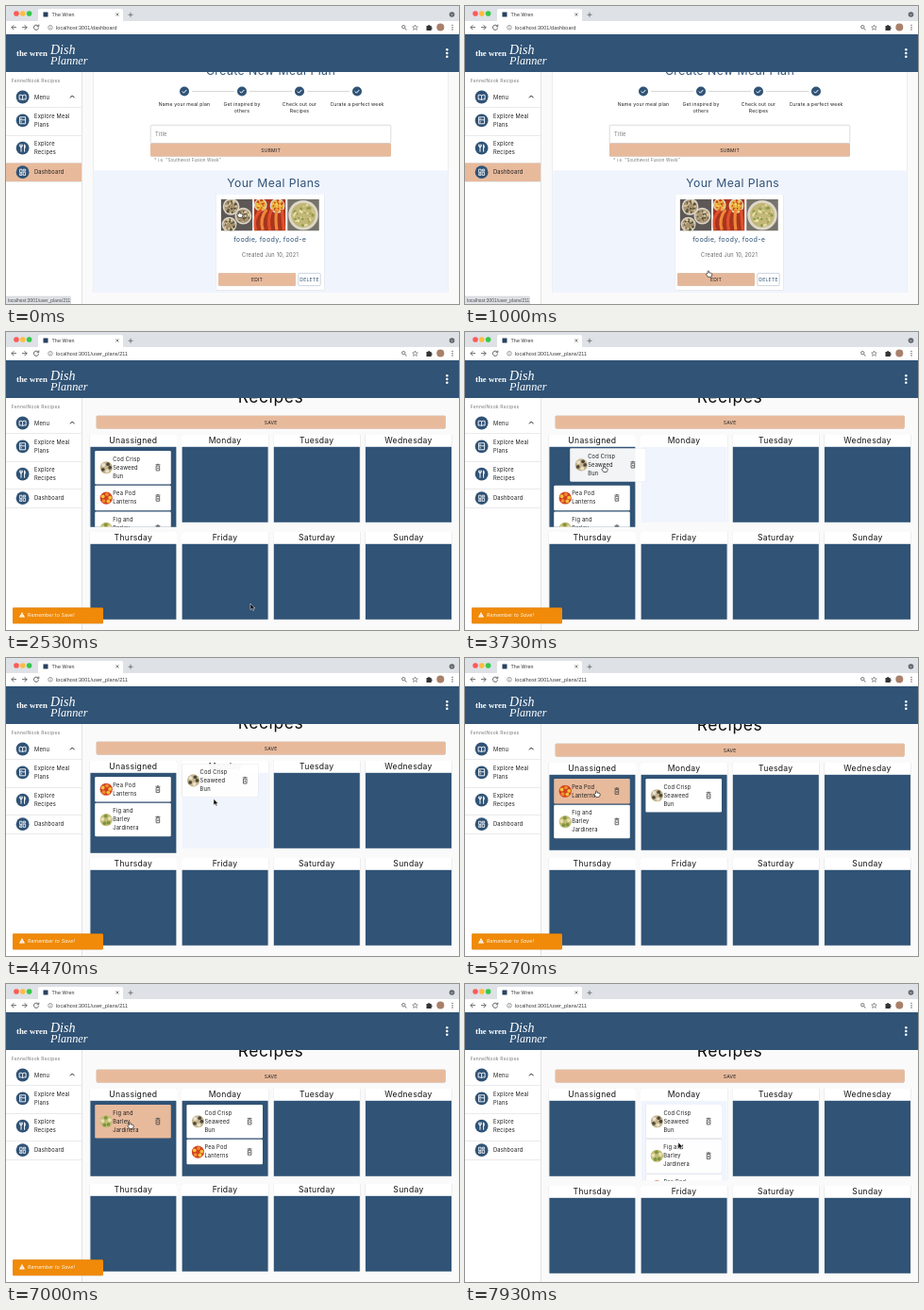
These frames come from a looping animation (480x316 px, 8 s). An HTML page:

```html
<!DOCTYPE html>
<html lang="en">
<head>
<meta charset="utf-8">
<title>Meal plan board</title>
<style>
html, body { margin: 0; width: 100%; height: 100%; overflow: hidden; background: #fafafa; }
svg { display: block; width: 100vw; height: 100vh; }
text { font-family: Inter, "Open Sans", sans-serif; letter-spacing: .035em; white-space: pre; }
.ui { font-family: "Liberation Sans", Roboto, sans-serif; letter-spacing: .022em; }
.logo { font-family: "Liberation Serif", "Noto Serif", serif; letter-spacing: 0; }
.up { filter: drop-shadow(0 .6px .6px #0004); }
</style>
</head>
<body>
<svg id="stage" viewBox="0 0 480 316" xmlns="http://www.w3.org/2000/svg"></svg>
<script>
const NAVY = '#305376', PEACH = '#e8ba9c', PALE = '#f0f4fd', INK = '#1c1c1c';
const LOOP = 8000, STEP = 200 / 3;
const OPEN = 2130; // the plan page replaces the dashboard
const $ = id => document.getElementById(id);

// markup helpers
const rect = (x, y, w, h, fill, more = '') =>
  `<rect x="${x}" y="${y}" width="${w}" height="${h}" fill="${fill}" ${more}/>`;
const dot = (x, y, r, fill, more = '') =>
  `<circle cx="${x}" cy="${y}" r="${r}" fill="${fill}" ${more}/>`;
const text = (x, y, size, str, fill = INK, more = '') =>
  `<text x="${x}" y="${y}" font-size="${size}" fill="${fill}" ${more}>${str}</text>`;
const mid = (x, y, size, str, fill, more = '') =>
  text(x, y, size, str, fill, 'text-anchor="middle" ' + more);
const line = (d, color = '#555', w = .9) =>
  `<path d="${d}" fill="none" stroke="${color}" stroke-width="${w}"/>`;
const group = (id, inner) => `<g id="${id}">${inner}</g>`;
const at = (x, y, inner) => `<g transform="translate(${x} ${y})">${inner}</g>`;
const each = (list, fn) => list.map(fn).join('');
const button = (x, y, w, h, label, size = 5.1) =>
  rect(x, y, w, h, PEACH, 'rx="1.3" class="up"') + mid(x + w / 2, y + h / 2 + 1.9, size, label);

function seeded(seed) {
  return () => (seed = seed * 16807 % 2147483647) / 2147483647;
}

function browser() {
  return rect(0, 0, 480, 17, '#dee1e6') + rect(0, 16, 480, 14, '#fff') +
    each(['#fc5b57', '#fdbc40', '#34c84a'], (c, i) => dot(11 + 6.8 * i, 8, 2.8, c)) +
    '<path d="M32 17q2 0 2-2V5q0-2 2-2h86q2 0 2 2v10q0 2 2 2z" fill="#fff"/>' +
    rect(39.5, 6.5, 5, 5, '#27415f') + text(48.5, 11.4, 5.3, 'The Wren', '#333', 'class="ui"') +
    line('M116.5 7.5l3 3m0-3l-3 3M129.5 9.3h5m-2.5-2.5v5', '#555', .7) +
    dot(472.5, 9, 2.8, '#5f6368') + line('M471.2 8.5l1.3 1.3 1.3-1.3', '#fff', .6) +
    line('M11 22.7H6m2.4-2.5L5.9 22.7l2.5 2.5M17 22.7h5m-2.4-2.5l2.5 2.5-2.5 2.5') +
    line('M34.2 21.3a2.6 2.6 0 1 0 .4 2M34.8 19.6v2.2h-2.2') +
    dot(47, 22.8, 2.3, 'none', 'stroke="#666" stroke-width=".6"') + line('M47 22.4v1.7M47 21.2v.6', '#666', .6) +
    text(53, 24.7, 5.4, '', '#333', 'id="address" class="ui"') +
    dot(421.3, 22.2, 1.7, 'none', 'stroke="#555" stroke-width=".8"') + line('M422.6 23.5l1.9 1.9') +
    line('M433.5 20l.8 1.9 2 .2-1.5 1.3.5 2-1.8-1.1-1.8 1.1.5-2-1.5-1.3 2-.2z', '#555', .6) +
    '<path d="M445.5 21h1.6a1 1 0 1 1 2 0h1.6v1.6a1 1 0 1 1 0 2v1.4h-5.2z" fill="#333"/>' +
    dot(460.3, 22.4, 4, '#a9806a') + each([-1, 0, 1], k => dot(473, 22.7 + 2.3 * k, .7, '#555'));
}

function header() {
  return rect(0, 30, 480, 40, NAVY, 'class="up"') +
    text(11, 52.6, 8.8, 'the wren', '#fff', 'class="logo" font-weight="700"') +
    text(47, 50.5, 14, 'Dish', '#fff', 'class="logo" font-style="italic"') +
    text(47, 62, 12.3, 'Planner', '#fff', 'class="logo" font-style="italic"') +
    each([-1, 0, 1], k => dot(467.3, 50 + 3.7 * k, 1.3, '#fff'));
}

function sidebar() {
  const items = [
    [96.5, ['Menu'], line('M-3.5-2q1.8-.8 3.5.4 1.7-1.2 3.5-.4v4.6q-1.8-.6-3.5.4-1.7-1-3.5-.4zM0-1.6V3', '#fff')],
    [121.3, ['Explore Meal', 'Plans'], line('M-3-3.5h6v7h-6zM-3-.5h6M-1.4-2.4v1M-1.4.8v1.4', '#fff')],
    [150.7, ['Explore', 'Recipes'], line('M-2.8-4v2.4q1.2 1.3 2.4 0V-4M-1.6-4v8M2-4v8M2-3.6q1.6 1.6 0 4', '#fff', 1)],
    [176.2, ['Dashboard'], line('M-3-3h2.4v3.4H-3zM.6-3H3v1.8H.6zM-3 1.6h2.4v1.6H-3zM.6 0H3v3.2H.6z', '#fff', .8)]
  ];
  return rect(0, 70, 80.3, 246, '#fff') + rect(80, 70, .7, 246, '#d8d8d8') +
    text(5.8, 80.8, 5, 'FennelNook Recipes', '#777') +
    rect(0, 166.4, 80, 19.6, PEACH, 'id="active"') +
    each([107.5, 137, 166, 186], y => rect(0, y, 80, .5, '#d5d5d5')) +
    each(items, ([y, rows, icon]) => at(17.6, y, dot(0, 0, 6.9, NAVY) + icon) +
      each(rows, (s, j) => text(30, y + 2 + 9 * j - 4.5 * (rows.length - 1), 5.75, s))) +
    line('M68 97.3l2.3-2.3 2.3 2.3', '#222', 1);
}

// a dish made of seeded blobs; bowls are [x, y, r]
function photo(x, back, bowls, colors, seed) {
  const rnd = seeded(seed);
  const food = ([cx, cy, r]) => dot(cx, cy, r, '#ddd7ca') + dot(cx, cy, r * .82, colors[0]) +
    each([...Array(Math.round(r * 4))], (_, i) => {
      const a = i * 2.4, d = r * .72 * Math.sqrt(rnd());
      return dot(cx + d * Math.cos(a), cy + d * Math.sin(a), .6 + rnd() * 1.1, colors[i % colors.length]);
    });
  return `<svg x="${x}" y="205" width="34" height="33.5" viewBox="0 0 34 34">${rect(0, 0, 34, 34, back)}${each(bowls, food)}`;
}

function dashboard() {
  const steps = [['Name your meal plan'], ['Get inspired by', 'others'], ['Check out our', 'Recipes'], ['Curate a perfect week']];
  const arms = each([0, 1, 2, 3, 4], i =>
    line(`M${2 + 7.5 * i} 33q${i - 5}-12 ${6 - 2 * i}-22`, i % 2 ? '#f0873a' : '#e2502c', 3.2));
  return rect(92.5, 60, 376, 244, '#fff', 'class="up"') + rect(92.5, 174.5, 376, 129.5, PALE) +
    mid(280.5, 73.3, 12.3, 'Create New Meal Plan', NAVY) +
    each(steps, (rows, i) => at(189 + 61 * i, 90.5, (i ? line('M-53 0h45', '#bdbdbd', .6) : '') +
      dot(0, 0, 5, NAVY) + line('M-2.2.1l1.6 1.6 2.9-3.2', '#fff', 1) +
      each(rows, (s, j) => mid(0, 15.3 + 7.5 * j, 5.1, s)))) +
    rect(153.2, 126.3, 254.6, 19.4, '#fff', 'stroke="#c4c4c4" stroke-width=".6" rx="1.3"') +
    text(158, 138, 5.65, 'Title', '#757575') + button(153, 145.7, 255, 13.8, 'SUBMIT') +
    text(157, 165, 4.5, '* i.e. "Southwest Fusion Week"', '#777') +
    mid(283.7, 192, 12.2, 'Your Meal Plans', NAVY) +
    rect(222.3, 200, 115, 101.5, '#fff', 'rx="1.3" class="up"') +
    photo(227.5, '#5d5856', [[11, 8, 9], [24, 18, 9], [9, 27, 8]], ['#a8916f', '#d8c7a0', '#55553f'], 7) + '</svg>' +
    photo(262.6, '#a8351d', [[7, 6, 7], [25, 7, 8]], ['#e8ad3c', '#f7cf55', '#c9481f'], 11) + arms + '</svg>' +
    photo(298, '#76736a', [[17, 17, 16]], ['#c3b777', '#8b9a4c', '#e8dfaa'], 5) + '</svg>' +
    mid(279.7, 249.8, 7.2, 'foodie, foody, food-e', NAVY) +
    mid(280, 265.6, 5.65, 'Created Jun 10, 2021', '#666') +
    button(225, 283.2, 82, 13.6, 'EDIT') +
    rect(225, 283.2, 82, 13.6, '#000', 'id="shade" rx="1.3"') +
    '<clipPath id="key"><rect x="225" y="283.2" width="82" height="13.6" rx="1.3"/></clipPath>' +
    dot(259, 290, 0, '#3b2415', 'id="ripple" opacity=".12" clip-path="url(#key)"') +
    rect(309.8, 283.4, 23.4, 13.2, '#fff', 'rx="1.3" stroke="#a9b8c8" stroke-width=".6"') +
    mid(321.5, 291.9, 5.2, 'DELETE', NAVY);
}

const DAYS = ['Unassigned', 'Monday', 'Tuesday', 'Wednesday', 'Thursday', 'Friday', 'Saturday', 'Sunday'];
const colX = i => 88.8 + 97.2 * (i % 4);

function panel(name, i) {
  const x = colX(i);
  return group('day' + i, rect(x, 0, 92.2, 93, '#fff', `id="back${i}" rx="1" class="up"`) +
    rect(x + .6, 12.8, 91, 80, NAVY, `id="list${i}"`) + mid(x + 46.1, 9.1, 8.6, name, '#111'));
}

const CARDS = [
  { rows: ['Cod Crisp', 'Seaweed', 'Bun'], tint: ['#c7b58e', '#4d4a3b', '#e9e2cf'] },
  { rows: ['Pea Pod', 'Lanterns'], tint: ['#d2421f', '#f2c23c', '#f08a34'] },
  { rows: ['Fig and', 'Barley', 'Jardinera'], tint: ['#c2bc74', '#7f9440', '#e9e1b4'] }
];
CARDS.forEach(c => c.h = 8.5 + 9 * c.rows.length);
const ORDER = [0, 2, 1]; // final order under Monday

// one drag per card: reach = pointer travel, from..end = drag, free = release,
// to = where the card is let go, grab = pointer inside the card
const DRAGS = [
  { reach: [2800, 3270], from: 3530, end: 4270, free: 4400, to: [186, 110.5], grab: [36, 19] },
  { reach: [4530, 5070], from: 5270, end: 5930, free: 6070, to: [178, 168], grab: [45, 13] },
  { reach: [6070, 6530], from: 7030, end: 7530, free: 7630, to: [189, 149], grab: [37, 19] }
];
DRAGS.forEach(d => { d.over = d.from + 200; d.done = d.free + 330; });

function card({ rows, h, tint }, i) {
  const bits = [0, 1, 2, 3, 4].map(k => dot(12 + 4 * Math.cos(k * 1.3 + i), h / 2 + 4 * Math.sin(k * 1.3 + i), 1.9, tint[1 + k % 2]));
  return group('clip' + i, group('card' + i, rect(0, 0, 80.6, h, '#fff', `id="face${i}" rx="1.3" class="up"`) +
    dot(12, h / 2, 6.6, tint[0]) + bits.join('') +
    each(rows, (s, j) => text(19, 10.6 + 9 * j, 5.75, s)) +
    at(66.7, h / 2, line('M-1.8-1.7h3.6v4.9h-3.6zM-2.5-3h5M-.8-3.5h1.6M-.7.1l1.4 1.4m0-1.4L-.7 1.5', '#444', .8))));
}

function board() {
  return group('top', mid(280.5, 74.6, 17.4, 'Recipes', '#111') + button(95.7, 88.8, 370, 13.6, 'SAVE')) +
    each(DAYS, panel) +
    each([0, 1], i => `<clipPath id="area${i}"><rect id="hole${i}" x="${colX(i)}" width="92"/></clipPath>`) +
    group('cards', each(CARDS, card));
}

$('stage').innerHTML = rect(0, 0, 480, 316, '#fafafa') +
  group('dash', dashboard()) + group('plan', board()) + sidebar() + header() + browser() +
  group('toast', rect(7, 292.3, 96, 17, '#f08a08', 'rx="1.3" class="up"') +
    '<path d="M17 297l3 5.5h-6z" fill="#fff"/>' + line('M17 299v1.6M17 301.1v.7', '#f08a08', .6) +
    text(23, 302.3, 5.1, 'Remember to Save!', '#fff', 'id="note"')) +
  group('status', rect(-1, 308, 69.5, 9, '#dee1e6', 'stroke="#c3c6cb" stroke-width=".5" rx="1"') +
    text(2, 314, 4.7, 'localhost:3001/user_plans/211', '#444', 'class="ui"')) +
  group('arrow', '<path d="M0 0V6.6L1.6 5.2 2.7 7.5 3.8 7 2.7 4.8H4.8Z" fill="#000" stroke="#fff" stroke-width=".5"/>') +
  group('hand', '<path d="M-.7 2.8V.3q.8-.9 1.5 0V2q2.6-.2 3.2 1.1 0 2-1 3.3h-3.4L-2.3 3.5q.4-1 1.6-.7z" fill="#fff" stroke="#000" stroke-width=".6"/>');

const part = (t, a, b) => {
  const u = Math.max(0, Math.min(1, (t - a) / (b - a)));
  return u * u * (3 - 2 * u);
};
const mix = (p, q, u) => p.map((v, i) => v + (q[i] - v) * u);
const add = (p, q) => p.map((v, i) => v + q[i]);
const between = (t, a, b) => t >= a && t < b;
const set = (id, attrs) => { for (const k in attrs) $(id).setAttribute(k, attrs[k]); };
const show = (id, on) => $(id).style.display = on ? '' : 'none';
const move = (id, [x, y]) => set(id, { transform: `translate(${x.toFixed(2)} ${y.toFixed(2)})` });

// layout: the page scrolls a little once the first card has settled
const topY = t => t < DRAGS[0].done ? 109 : 111;

// place of a card in list 0 or 1, below those already there
function slot(i, list, t) {
  const order = list ? ORDER : CARDS.map((_, k) => k);
  const above = order.slice(0, order.indexOf(i)).reduce((sum, k) => {
    const gone = part(t, DRAGS[k].over, DRAGS[k].over + 200);
    return sum + (CARDS[k].h + 1.3) * (list ? gone : 1 - gone);
  }, 0);
  return [colX(list) + 5.4, topY(t) + 17 + above];
}

function cardAt(i, t) {
  const d = DRAGS[i];
  if (t < d.from) return slot(i, 0, t);
  const dragged = mix(slot(i, 0, d.from), d.to, part(t, d.from, d.end));
  return mix(dragged, slot(i, 1, t), part(t, d.free, d.done));
}

// pointer legs: start, end, goal
const LEGS = [
  [470, 1130, [259, 288]], [2570, 2730, [212, 286]], [4400, 4466, [220, 149.5]],
  ...DRAGS.flatMap((d, i) => [
    [...d.reach, add(slot(i, 0, d.from), d.grab)],
    [d.from, d.end, add(d.to, d.grab)]
  ])
].sort((a, b) => a[0] - b[0]);
const pointer = t => LEGS.reduce((p, [a, b, goal]) => mix(p, goal, part(t, a, b)), [247, 218]);

function drawBoard(t) {
  const y1 = topY(t);
  const full = [t < DRAGS[0].done, t >= DRAGS[2].over]; // a list of three cards is taller
  const y2 = y1 + (full[0] || full[1] ? 103 : 101);
  const glow = [
    DRAGS.some(d => between(t, d.from, d.over)),
    DRAGS.some(d => between(t, d.over, d.done))
  ];
  move('top', [0, y1 - 109]);
  DAYS.forEach((_, i) => {
    const y = i < 4 ? y1 : y2, h = full[i] ? 98 : 93;
    move('day' + i, [0, y]);
    set('back' + i, { height: h });
    set('list' + i, { height: h - 13, fill: glow[i] ? PALE : NAVY });
    if (i < 2) set('hole' + i, { y: y + 12.8, height: h - 13 });
  });
  DRAGS.forEach((d, i) => {
    const held = between(t, d.from, d.done);
    move('card' + i, cardAt(i, t));
    set('clip' + i, { 'clip-path': held ? 'none' : `url(#area${t < d.from ? 0 : 1})` });
    set('face' + i, { fill: between(t, d.reach[1] - 70, d.from) ? PEACH : '#fff', opacity: held ? .94 : 1 });
    if (held && $('cards').lastChild !== $('clip' + i)) $('cards').append($('clip' + i));
  });
}

function draw(t) {
  const open = t >= OPEN;
  show('plan', open);
  ['dash', 'active', 'status'].forEach(id => show(id, !open));
  $('address').textContent = 'localhost:3001/' + (open ? 'user_plans/211' : 'dashboard');
  if (open) drawBoard(t);
  set('shade', { opacity: .3 * part(t, 980, 1130) });
  set('ripple', { r: 52 * part(t, 1440, 1610) });

  const slide = part(t, 2190, 2430) - part(t, 7250, 7500);
  show('toast', slide > 0);
  move('toast', [-110 * (1 - slide), 0]);
  set('note', { 'font-style': t > 2600 ? 'italic' : 'normal' });

  const hand = !open || DRAGS.some(d => between(t, d.reach[1], d.free));
  show('hand', hand);
  show('arrow', !hand);
  move(hand ? 'hand' : 'arrow', pointer(t));
}

// the picture advances 15 times per second
function tick() {
  const t = performance.now() % LOOP;
  draw(Math.floor((t + 4) / STEP) * STEP % LOOP);
  requestAnimationFrame(tick);
}
tick();
</script>
</body>
</html>
```
